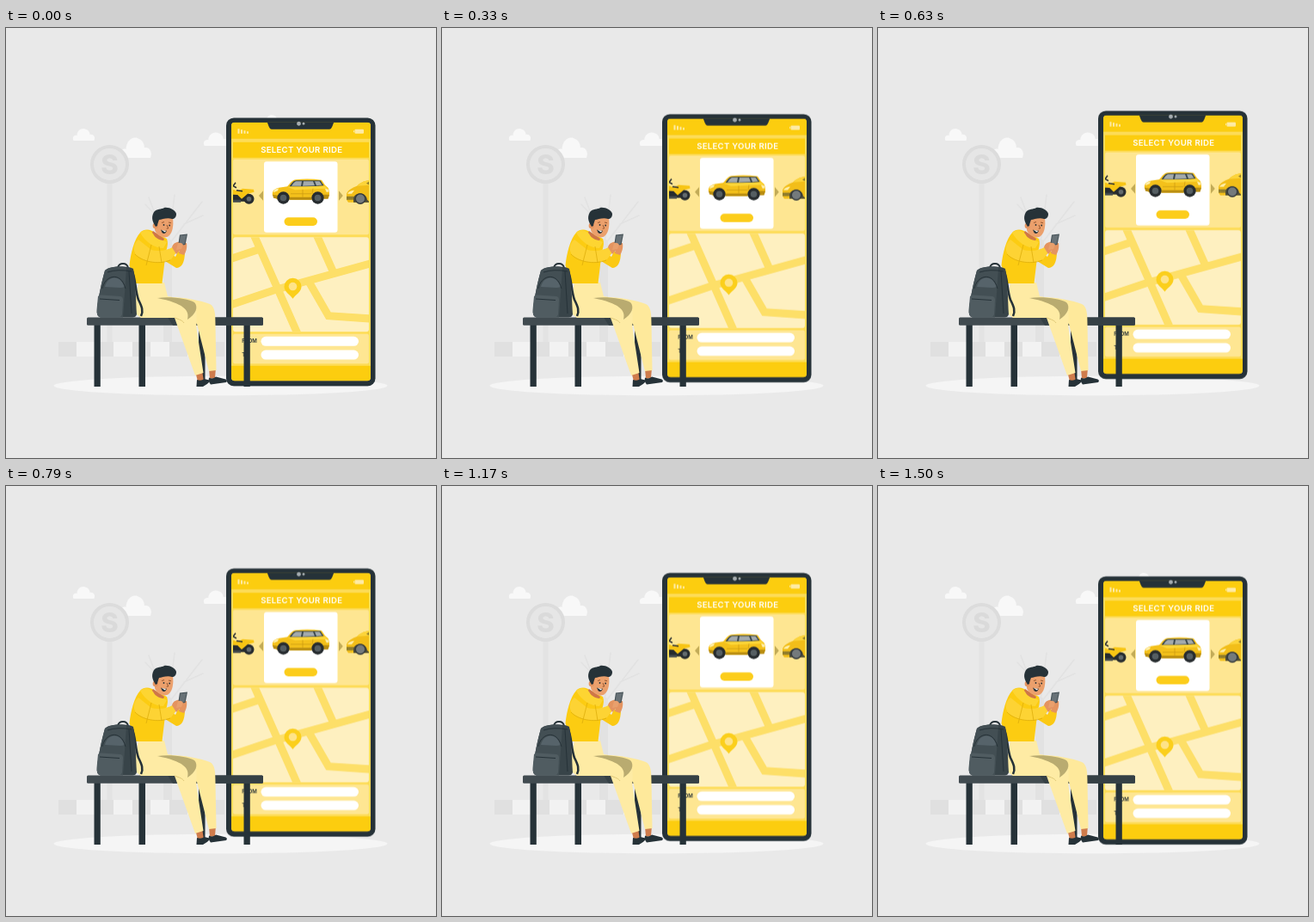
Recreate the animation shown at these times as an HTML page. Size 500x500 px, loop 1540 ms.

```html
<!DOCTYPE html>
<html lang="en">
<head>
<meta charset="utf-8">
<title>Select your ride</title>
<style>
  html, body { margin: 0; width: 100%; height: 100%; overflow: hidden; background: #e9e9e9; }
  svg { display: block; width: 100%; height: 100%; }
  text { font-family: Inter, "Open Sans", sans-serif; }
  .dark { fill: #263238; }
  .yellow { fill: #fccd0f; }
  .road { fill: none; stroke: #fddf68; stroke-width: 9; }
</style>
</head>
<body>
<svg viewBox="0 0 500 500">
  <defs>
    <clipPath id="screen"><rect x="262" y="110" width="162" height="300.5" rx="4"/></clipPath>
    <clipPath id="carousel"><rect x="264" y="153" width="158" height="88"/></clipPath>
    <clipPath id="map"><rect x="264" y="243.5" width="158" height="110" rx="3"/></clipPath>
    <path id="cloud" d="M1 14C-1 10 2 7 5 8C5 2 11-2 16 1C19 2 20 5 20 7C24 6 27 10 25 14Z"/>
  </defs>

  <!-- street -->
  <g fill="#f8f8f8">
    <use href="#cloud" x="77.500" y="117"/>
    <use href="#cloud" transform="translate(132.500 127.500) scale(1.42 1.68)"/>
    <use href="#cloud" transform="translate(229.500 121.500) scale(1.15 1.1)"/>
    <use href="#cloud" transform="translate(299 101) scale(.8)"/>
  </g>
  <g fill="none" stroke="#e2e2e2" stroke-linecap="round">
    <path d="M188 365V250" stroke-width="10"/>
    <path d="M188 255L166 197M189 250L196 194M190 251L228 202M174 218L162 205M207 228L229 218M192 222L184 207" stroke-width="1.600"/>
  </g>
  <rect x="117.500" y="181" width="6" height="184" fill="#e3e3e3"/>
  <circle cx="120.500" cy="158.500" r="20.500" fill="#e6e6e6" stroke="#dcdcdc" stroke-width="4"/>
  <text x="120.500" y="169.500" text-anchor="middle" font-size="31" font-weight="800" fill="#dadada">S</text>
  <rect x="61" y="365" width="193" height="17" fill="#e0e0e0"/>
  <path d="M82 365h21v17h-21zM125 365h22v17h-22zM168 365h22v17h-22zM211 365h22v17h-22z" fill="#f2f2f2"/>
  <ellipse cx="249.500" cy="416" rx="194" ry="11.300" fill="#f5f5f5"/>

  <!-- big phone -->
  <g id="phone">
    <rect class="dark" x="256" y="104.700" width="173.500" height="312" rx="9"/>
    <g clip-path="url(#screen)">
      <rect x="262" y="110" width="162" height="301" fill="#fddc58"/>
      <path class="yellow" d="M262 110h162v19H262zM264 133h158v18H264zM262 393h162v18H262z"/>
      <path class="dark" d="M303 109H382C380 111 379.500 118 376 118H309C305.500 118 305 111 303 109Z"/>
    </g>
    <circle cx="340.500" cy="111.500" r="2.400" fill="#a5acaf"/>
    <circle cx="346" cy="111.500" r="1.400" fill="#a5acaf"/>
    <path d="M269.500 117.500h2v5.500h-2zM273 118.500h2v4.500h-2zM276.500 119.500h2v3.500h-2zM280 120.500h2v2.500h-2z" fill="#feeba5"/>
    <rect x="405.500" y="118" width="10.500" height="5" rx="1" fill="#feeba5"/>
    <path d="M405 119.500h-1v2h1z" fill="#feeba5"/>
    <text x="343.700" y="145.500" text-anchor="middle" font-size="9.600" font-weight="600" letter-spacing=".3" fill="#fff">SELECT YOUR RIDE</text>

    <rect x="264" y="153" width="158" height="87.500" rx="2" fill="#fee692"/>
    <rect x="300" y="155.500" width="85.500" height="82.500" rx="3" fill="#fff"/>
    <rect x="323.500" y="220.500" width="38.500" height="9.700" rx="4.850" fill="#fccd1b"/>
    <path d="M294 195.300L299 189.500V201ZM391.800 195.300L387 189.500V201Z" fill="#c2ab57"/>

    <g id="suv">
      <path d="M310 195C309 190 312 187 317 186L327 184.500C331 180 333 177 337 176.500C347 175.300 357 175.500 367 177L371 183L374.500 186C376.500 190 376.500 195 374.500 198L356 200H316Z" fill="#f4c11b"/>
      <path d="M329.500 184.500C333 179.500 334.500 177.800 337.500 177.500H365.500L369.500 183.500L350 185Z" fill="#39464c"/>
      <path d="M332 184C335 179.500 336 178.700 338 178.500H344L343 184ZM346 178.500H357L359 183.500L345 184ZM359 178.500H364.500L367.500 182.800L361 183.500Z" fill="#a3aaac"/>
      <path d="M327 185L371 184L374.500 187L336 188.500Z" fill="#fcd638"/>
      <path d="M312 188l5-1.500l-1 3l-5 2zM371 187l4 1l.5 3h-3z" fill="#fff0ab"/>
      <path d="M310 194l6 1v4l-5-1zM330 197h25v3h-25zM369 194h7l-1.500 5h-5z" fill="#b98d10"/>
      <path d="M345 188v9M357 187l-1 6M331 193h24" fill="none" stroke="#c99a12" stroke-width=".7"/>
    </g>
    <g fill="#272c2f">
      <circle cx="322.500" cy="197.700" r="7.200"/><circle cx="362.500" cy="197.700" r="7.200"/>
    </g>
    <g fill="#555e62">
      <circle cx="322.500" cy="197.700" r="3.800"/><circle cx="362.500" cy="197.700" r="3.800"/>
    </g>

    <g clip-path="url(#carousel)">
      <path d="M264 193L273 195L279 191L287 196L280 202H264Z" fill="#272c2f"/>
      <circle cx="282.500" cy="199" r="6" fill="#272c2f"/>
      <circle cx="282.500" cy="199" r="2.800" fill="#636b6e"/>
      <path d="M264 188L270 190L275 187L288 188L288.500 191L281 193L274 199L269 194H264Z" fill="#f8c514"/>
      <path d="M264 184l3-4M264 184l4 2M268 189l7 1" fill="none" stroke="#272c2f" stroke-width="1.500"/>
      <path d="M264 200h9v3h-9z" fill="#42494c"/>
      <path d="M396 200V193C398 188 403 186 408 184C412 180 416 178 423 177V203H398Z" fill="#f2be19"/>
      <path d="M408 184C412 180 416 178 423 177V183Z" fill="#fcd43a"/>
      <path d="M419 181l4-3v5zM396 196h9v4h-9z" fill="#8f7c2c"/>
      <path d="M397 193c2-3 5-4 8-4l-3 4z" fill="#fff0ab"/>
      <path d="M404 199C405 190 419 190 420 200L423 203H404Z" fill="#4d4c38"/>
      <circle cx="412" cy="198.800" r="6.400" fill="#33393c"/>
      <circle cx="412" cy="198.800" r="5" fill="#747a7c"/>
    </g>

    <g clip-path="url(#map)">
      <rect x="264" y="243" width="158" height="111" fill="#fef0c0"/>
      <path class="road" d="M287 238L340 358M260 269L299 256M260 322.500L312 305L428 273M360 238L381 285M352 295L375 335L428 338.500"/>
    </g>
    <path d="M333.500 315C330 310 323.500 307 323.500 301A10 10 0 0 1 343.500 301C343.500 307 337 310 333.500 315Z" fill="#fbcf1c"/>
    <circle cx="333.500" cy="300.800" r="4.800" fill="#fee388"/>

    <rect x="264" y="356" width="158" height="34.500" rx="2" fill="#fee692"/>
    <rect x="296.500" y="359" width="113.500" height="11" rx="5.500" fill="#fff"/>
    <rect x="296.500" y="374.800" width="113.500" height="11" rx="5.500" fill="#fff"/>
    <g class="dark" font-size="6" font-weight="600">
      <text x="274.300" y="366.700">FROM</text>
      <text x="274.300" y="382.500">TO</text>
    </g>
  </g>

  <!-- bench -->
  <g class="dark">
    <path d="M102.500 345h7.300v72h-7.300zM154.500 345h7.500v72h-7.500zM276.500 345h7.300v72h-7.300zM224 345h7.500v65h-7.500z"/>
  </g>
  <rect x="94" y="336.500" width="205" height="9.200" rx="1.500" fill="#414b50"/>
  <path d="M188 336.500H297.500Q299 336.500 299 338V344.200Q299 345.700 297.500 345.700H194Z" fill="#354045"/>

  <!-- legs -->
  <path d="M236 396L244 395L243 407L237 408ZM220 399L228 398L230 411L223 411Z" fill="#cf7c4c"/>
  <path class="dark" d="M236 406.500Q240 409 244 405.500Q250 407 255.500 408.500Q258 410 256 412L238 414.500Q235 411 236 406.500ZM222 409Q227 411 230.500 408L236.500 409.500Q237 412 233 414.500L229 417H221.500Z"/>
  <path d="M180 313C204 312 226 317 237 321C243 324 243.500 332 243.500 345L244.500 398L236 399L222 344C211 337 190 335 180 326Z" fill="#fee99b"/>
  <path d="M154 296H184L188 312C201 314 214 318 220 324C223 331 221 340 221.500 349L229.500 401L220 404L196 337H157L148 330Z" fill="#feeba4"/>
  <path d="M176 314C193 312 212 315 219 319C224 324 221 333 211 339C214 328 206 320 176 314Z" fill="#b9ab70"/>
  <path d="M196 337C202 339 205 340 207 343" fill="none" stroke="#e0c978"/>

  <!-- torso and head -->
  <path d="M156 238C161 233 168 234 173 238L187 245C190 253 185 259 185 267L181.500 297H151C149 290 146 283 143.500 276C145 262 149 246 156 238Z" fill="#fccc12"/>
  <path d="M171 236L184 245L181 252C174 250 169 246 167 243Z" fill="#ce7648"/>
  <path d="M156 238C162 232 171 237 172 241C176 247 182 246 187 249L183 256C173 256 162 249 156 238Z" fill="#fdd532"/>
  <path d="M185 271L198 279C204 279 208 273 208 260L200 260L197 266L188 259Z" fill="#fbc914"/>
  <path d="M154 246C147 251 147 262 154 266C166 274 180 274 192 269L199 260L195 254C188 259 177 260 169 258Z" fill="#fdd334"/>
  <path d="M150 263C157 271 176 276 191 270M169 252L163 276M178 254L181 273" fill="none" stroke="#ddae0b" stroke-width=".8"/>
  <path d="M193 255C194 250 199 248 203 249L205 256C201 258 201 261 198 263ZM203 251L210 250C211 256 209 261 207 264L201 262Z" fill="#e49460"/>
  <path d="M202 240.500L211 239.500L208.500 252L200 253.500Z" fill="#465258"/>
  <path d="M202.800 241.500L209.700 240.800L207.500 251L201.500 252Z" fill="#687277"/>
  <path d="M200 250q4-1 6 2l-2 5l-6 1z" fill="#e9a06d"/>
  <path d="M172 221C178 216 190 217 194 221C195 229 194 238 189 242C184 246 175 241 173 235Z" fill="#eba06c"/>
  <circle cx="173.800" cy="230" r="3.200" fill="#e49460"/>
  <path class="dark" d="M174 231C171 226 168 221 172 214C175 210 181 211 184 209C190 208 197 212 198 216C198 220 196 222 193 222C187 220 181 223 178 223C177 226 176 228 176 230Z"/>
  <path class="dark" d="M180 234.500Q184 236.500 187 235.500Q185 241 181.500 238Z"/>
  <path d="M181 235l5 1l-1 1.500z" fill="#fff"/>
  <g class="dark"><circle cx="183.500" cy="229" r=".9"/><circle cx="190.200" cy="229.500" r=".9"/></g>
  <path d="M181 226.500l3-1M189 226l3 .7M187 229l1.700 4l-2 .3" fill="none" stroke="#824623" stroke-width=".8"/>

  <!-- backpack -->
  <path d="M130 279Q131 274 136 274Q141 274 142 279" fill="none" stroke="#263238" stroke-width="2"/>
  <path d="M146 280C151 292 150 305 154 316C158 324 160 329 157 335" fill="none" stroke="#263238" stroke-width="2.600"/>
  <path d="M115 282C120 276 142 276 148 280C151 296 151 318 152 333Q151 336.500 147 336.500H110Q105 335 106 328C107 315 111 296 115 282Z" fill="#384449"/>
  <path d="M115 282C120 277 134 277 140 279L136 336.500H110Q105 335 106 328C107 315 111 296 115 282Z" fill="#434f54"/>
  <path d="M107 312Q108 310 112 310.500L133 312Q136 312.500 136 316L135 333Q134 336.500 130 336.500H110Q105 335 105.500 328Z" fill="#505c61"/>
  <path d="M115 301C118 288 132 287 137 299Q139 302 133 302Z" fill="#56636a"/>
  <path d="M112 303C114 289 133 281 139 303M118 284Q130 280 146 283M109 315L132 316.500M143 283L146 332" fill="none" stroke="#263238" stroke-width="1"/>
</svg>
<script>
  // [time in ms, vertical shift in px]
  const LOOP = 1540;
  const float = [
    [0, 0], [170, -2.3], [340, -4.7], [500, -6.9], [610, -8.3], [720, -9.1], [790, -8.9],
    [870, -8.2], [960, -6.8], [1080, -5.2], [1170, -3.8], [1340, -1.2], [1430, -0.1], [1500, 0.3], [LOOP, 0]
  ];
  document.getElementById("phone").animate(
    float.map(([t, y]) => ({ offset: t / LOOP, transform: `translateY(${y}px)` })),
    { duration: LOOP, iterations: Infinity }
  );
</script>
</body>
</html>
```
